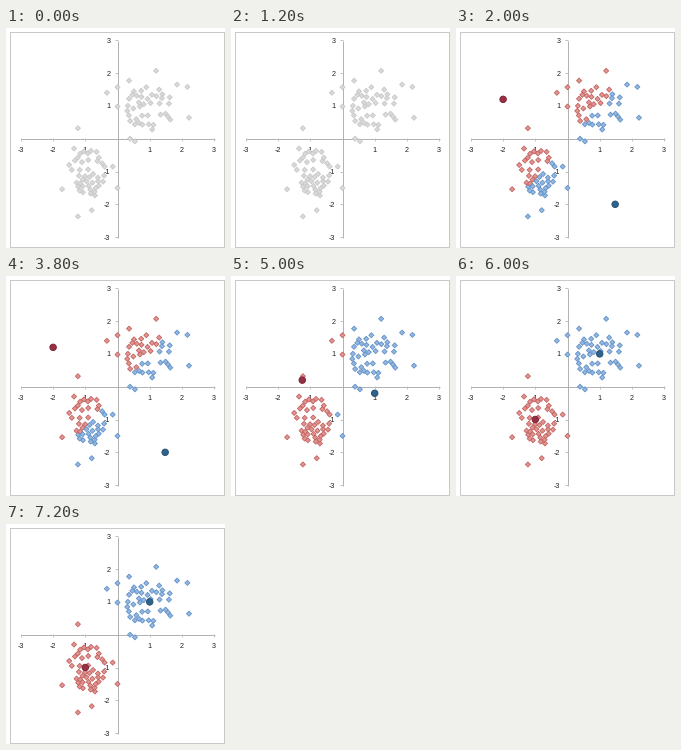
Animation, 219 px wide and 220 px high, one loop 8 s. Source, as a matplotlib script:

```python
import numpy as np
import matplotlib.pyplot as plt
from matplotlib.animation import FuncAnimation

W, H, DPI = 219, 220, 64
PX = 72 / DPI                      # one pixel in points
ORIGIN = np.array([111.5, 110.7])
UNIT = np.array([32.2, -32.8])     # pixels per axis unit

GRAY = ("#d9d9d9", "#c8c8ca")
RED = ("#df9592", "#c4605d")
BLUE = ("#95b6df", "#5f91c8")
RED_MEAN = ("#963044", "#7c2232")
BLUE_MEAN = ("#2f638f", "#25506f")

# Outliers that give each cloud its outline, in axis units.
UPPER_RIM = [(-0.33, 1.4), (0, 1.57), (0, 0.98), (0.36, 1.77), (1.2, 2.07),
             (1.85, 1.65), (2.17, 1.58), (2.22, 0.64), (0.39, 0), (0.54, -0.08)]
LOWER_RIM = [(-1.23, 0.32), (-0.15, -0.85), (0, -1.5), (-0.4, -0.85),
             (-1.72, -1.54), (-1.5, -0.8), (-1.23, -2.37), (-0.8, -2.18),
             (-0.7, -1.73), (-1.35, -0.3)]


def cloud(rim, center, radii, count, rng, gap=0.11):
    """Fill an ellipse inside the rim with random, spaced points."""
    points = [np.array(p, float) for p in rim]
    while len(points) < len(rim) + count:
        radius, angle = np.sqrt(rng.random()), rng.uniform(0, 2 * np.pi)
        direction = np.array([np.cos(angle), np.sin(angle)])
        point = np.array(center) + radius * direction * radii
        if np.linalg.norm(np.array(points) - point, axis=1).min() > gap:
            points.append(point)
    return np.array(points)


rng = np.random.default_rng(4)
POINTS = np.vstack([cloud(UPPER_RIM, (1, 0.9), (0.72, 0.75), 38, rng),
                    cloud(LOWER_RIM, (-0.9, -1), (0.52, 0.7), 38, rng)])

# Red and blue means of each k-means step.
STEPS = [((-2, 1.2), (1.48, -2)),
         ((-1.25, 0.2), (1, -0.2)),
         ((-1, -1), (1, 1))]
FRAME_STEPS = [None, None, 0, 0, 0, 1, 2, 2]


def to_stage(points):
    return ORIGIN + np.array(points) * UNIT


fig = plt.figure(figsize=(W / DPI, H / DPI), dpi=DPI, facecolor="white")
ax = fig.add_axes([0, 0, 1, 1])
ax.set(xlim=(0, W), ylim=(H, 0))
ax.axis("off")


def line(xs, ys, color):
    ax.plot(xs, ys, color=color, lw=PX, solid_capstyle="butt", zorder=1)


def label(x, y, text, align):
    ax.text(x, y, text, fontsize=7.3 * PX, family="Liberation Sans",
            color="#222222", ha=align, va="center_baseline", zorder=2)


line([3.5, 217.5, 217.5, 3.5, 3.5], [3.5, 3.5, 218.5, 218.5, 3.5], "#c8c8c8")
line([15, 208.5], [110.5, 110.5], "#b2b2b2")
line([111.5, 111.5], [12.5, 209.5], "#b2b2b2")
for n in (-3, -2, -1, 1, 2, 3):
    x, y = to_stage((n, n))
    line([x, x], [110, 113], "#c0c0c0")
    line([109, 112], [y, y], "#c0c0c0")
    label(x, 121.5, str(n), "center")
    label(104.5, y, str(n), "right")

dots = ax.scatter(*to_stage(POINTS).T, marker="D", s=(3.6 * PX) ** 2,
                  linewidths=0.8 * PX, zorder=3)
means = ax.scatter([0, 0], [0, 0], s=(6.5 * PX) ** 2, linewidths=0.9 * PX,
                   facecolors=[RED_MEAN[0], BLUE_MEAN[0]],
                   edgecolors=[RED_MEAN[1], BLUE_MEAN[1]], zorder=4)


def update(frame):
    step = FRAME_STEPS[frame]
    means.set_visible(step is not None)
    if step is None:
        colors = [GRAY] * len(POINTS)
    else:
        centers = np.array(STEPS[step])
        means.set_offsets(to_stage(centers))
        distance = np.linalg.norm(POINTS[:, None] - centers, axis=2)
        colors = [(RED, BLUE)[k] for k in distance.argmin(axis=1)]
    dots.set_facecolor([c[0] for c in colors])
    dots.set_edgecolor([c[1] for c in colors])
    return dots, means


anim = FuncAnimation(fig, update, frames=len(FRAME_STEPS), interval=1000,
                     repeat=True, repeat_delay=0)
plt.show()
```
